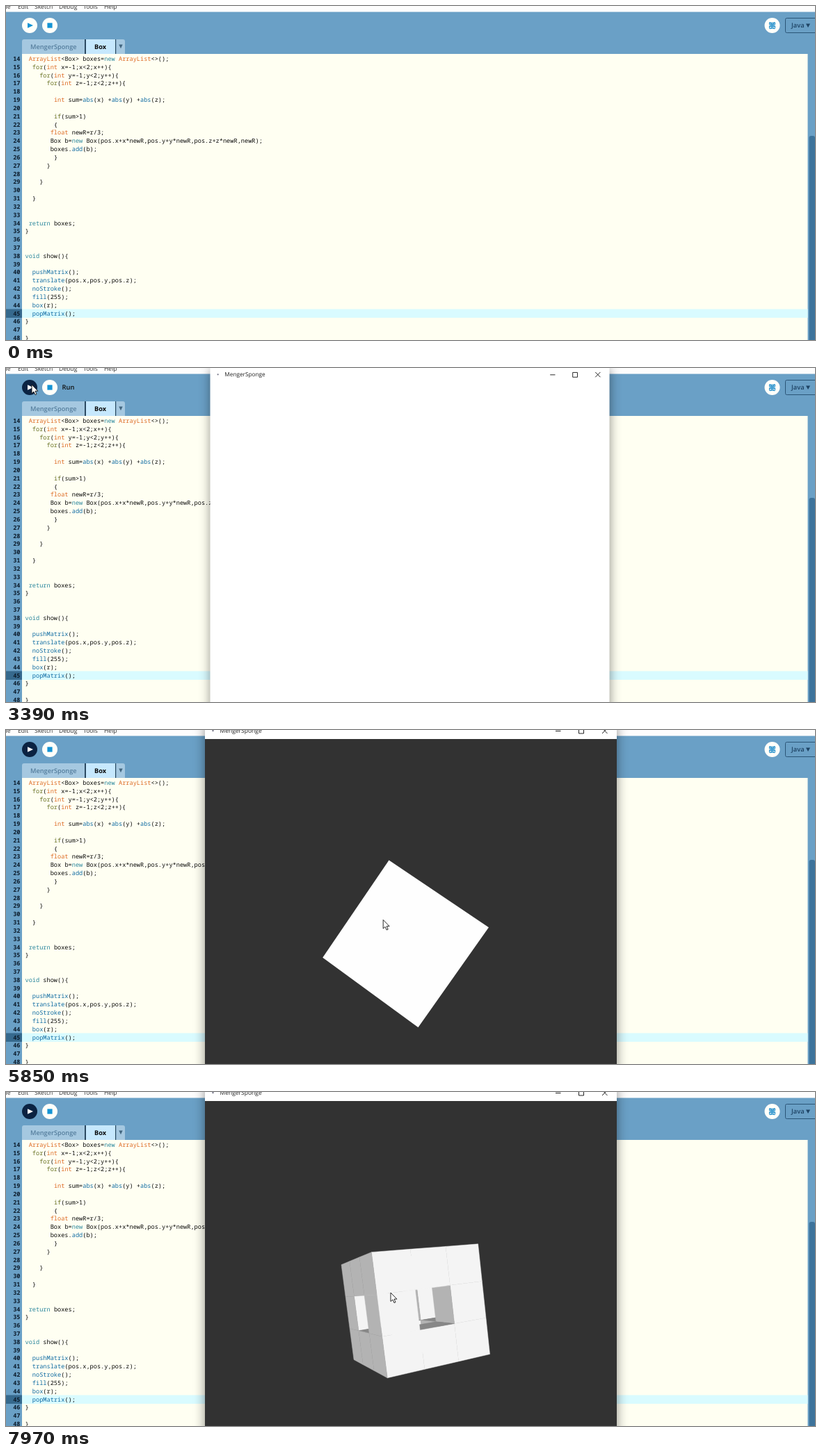
Recreate the animation shown at these times as an HTML page with a canvas. Size 1163 px wide and 481 px high, loop 8000 ms.

```html
<!DOCTYPE html>
<html lang="en">
<head>
<meta charset="utf-8">
<title>Sponge sketch</title>
<style>
  html, body { margin: 0; width: 100%; height: 100%; overflow: hidden; background: #fffff2; }
  #stage { position: relative; width: 1163px; height: 481px; overflow: hidden; }
  #stage > svg { position: absolute; left: 0; top: 0; }
  text { text-rendering: geometricPrecision; white-space: pre; }
  .ui { font-family: "Open Sans", "Noto Sans", sans-serif; }
  .semi { font-weight: 600; }
  #code, #nums { font: 8.62px "Noto Sans Mono", "DejaVu Sans Mono", monospace; }
  #nums { font-weight: 600; text-anchor: end; fill: #0c1c2c; }
  #win {
    position: absolute; left: 286px; top: -10px; width: 592px; height: 620px;
    background: #fff; transform-origin: 0 0; box-shadow: 0 3px 15px rgba(0, 0, 0, .45);
  }
  #win canvas { position: absolute; left: 0; top: 23px; }
  #win svg { position: absolute; left: 0; top: 0; }
</style>
</head>
<body>
<div id="stage">
  <svg width="1163" height="481">
    <rect width="1163" height="481" fill="#6aa0c6"/>
    <rect width="1163" height="8" fill="#fdfdfd"/>
    <rect y="8" width="1163" height="1" fill="#b4cfe2"/>
    <g class="ui" font-size="8.6" fill="#333">
      <text x="-7" y="4">File</text><text x="17" y="4">Edit</text>
      <text x="41" y="4">Sketch</text><text x="76" y="4">Debug</text>
      <text x="111" y="4">Tools</text><text x="141" y="4">Help</text>
    </g>

    <circle id="play" cx="34" cy="28" r="11"/>
    <path id="playMark" d="M31 24.2L39 28L31 31.8Z"/>
    <circle cx="63" cy="28" r="11" fill="#fffffa"/>
    <rect x="59.4" y="24.4" width="7.2" height="7.2" fill="#1594d4"/>
    <text id="run" class="ui semi" x="80.5" y="31.3" font-size="9.4" fill="#111">Run</text>

    <circle cx="1101.5" cy="28" r="11" fill="#fffffa"/>
    <g fill="none" stroke="#3b9bd0" stroke-width="1.4">
      <path d="M1100.6 23.5V33M1102.4 23.5V33M1098 26.8H1105M1098 29H1105"/>
      <path d="M1100.6 27Q1098.5 22 1097.6 24.5V27M1102.4 27Q1104.5 22 1105.4 24.5V27"/>
      <path d="M1100.6 29H1097.6V31.5Q1098.5 34 1100.6 31M1102.4 29H1105.4V31.5Q1104.5 34 1102.4 31"/>
    </g>
    <rect x="1120.5" y="17.5" width="60" height="21" rx="2" fill="none" stroke="#2b5577"/>
    <text class="ui semi" x="1129" y="31.2" font-size="9.3" fill="#1f4465">Java</text>
    <path d="M1150 25.5H1156L1153 31Z" fill="#1f4465"/>

    <path d="M23 69V51Q23 48 26 48H113V69Z" fill="#a5c8e0"/>
    <rect x="113" y="48" width="2" height="21" fill="#2c4a62"/>
    <rect x="115" y="48" width="42" height="21" fill="#c6e8fd"/>
    <rect x="157" y="48" width="1.4" height="21" fill="#2c4a62"/>
    <path d="M158.4 69V48H168Q171 48 171 51V69Z" fill="#a5c8e0"/>
    <path d="M162.3 55.5H167.7L165 61.2Z" fill="#41657f"/>
    <g class="ui semi" font-size="9.2">
      <text x="35" y="61.5" fill="#557e9d">MengerSponge</text>
      <text x="127" y="61.5" fill="#0a0a0a" font-weight="700">Box</text>
    </g>

    <rect x="23" y="69" width="1129.5" height="412" fill="#fffff2"/>
    <rect x="0" y="436.5" width="23" height="12.5" fill="#36698d"/>
    <rect x="23" y="436.5" width="1129.5" height="12.5" fill="#d9fbff"/>
    <rect x="1154.5" y="187" width="8.5" height="310" rx="3" fill="#3d739b"/>
    <g id="nums"></g>
    <g id="code"></g>
    <rect id="caret" x="100" y="436.5" width="1" height="12.5" fill="#000"/>
  </svg>

  <div id="win">
    <svg width="592" height="23">
      <circle cx="11.5" cy="11" r="1.2" fill="#778"/>
      <text class="ui" x="21.5" y="14.2" font-size="8.5" fill="#222">MengerSponge</text>
      <path d="M504 11.5H511.5M537.5 8H544.5V15H537.5ZM571 7.5L578.5 15M578.5 7.5L571 15"
            fill="none" stroke="#222"/>
    </svg>
    <canvas id="view" width="592" height="600"></canvas>
  </div>

  <svg width="1163" height="481">
    <circle id="click" r="9" fill="#f2ec2c" fill-opacity=".9"/>
    <path id="arrow" d="M0 0V12.6L2.9 10L5 14.6L7 13.7L5 9.2H8.9Z" fill="#fff" stroke="#111" stroke-width=".9"/>
    <path id="beam" d="M-2 -6H2M0 -6V6M-2 6H2" fill="none" stroke="#77776f" stroke-width=".9"/>
  </svg>
</div>

<script>
const LOOP = 8000, OPEN = 3260, TICK = 66.34, SPLIT = 6570;
const $ = id => document.getElementById(id);
const show = (id, on) => { $(id).style.display = on ? '' : 'none'; };

// ---- editor text ----
const FIRST = 14, ROW = 11.83, COL = 5.172;
const SOURCE = ` ArrayList<Box> boxes=new ArrayList<>();
  for(int x=-1;x<2;x++){
    for(int y=-1;y<2;y++){
      for(int z=-1;z<2;z++){

        int sum=abs(x) +abs(y) +abs(z);

        if(sum>1)
        {
       float newR=r/3;
       Box b=new Box(pos.x+x*newR,pos.y+y*newR,pos.z+z*newR,newR);
       boxes.add(b);
        }
      }

    }

  }


 return boxes;
}


void show(){

  pushMatrix();
  translate(pos.x,pos.y,pos.z);
  noStroke();
  fill(255);
  box(r);
  popMatrix();
}

}`.split('\n');

const INKS = [
  [/^(ArrayList|int|float)$/, '#dd6a24'],
  [/^(for|if)$/, '#677022'],
  [/^(new|void|return)$/, '#2b879d'],
  [/^(abs|add|pushMatrix|translate|noStroke|fill|box|popMatrix)$/, '#0f6ba3']
];
const inkOf = word => (INKS.find(([re]) => re.test(word)) || [0, '#0a0a0a'])[1];

function addText(parent, x, y, str, fill) {
  const el = document.createElementNS('http://www.w3.org/2000/svg', 'text');
  el.setAttribute('x', x.toFixed(2));
  el.setAttribute('y', y.toFixed(2));
  if (fill) el.setAttribute('fill', fill);
  el.textContent = str;
  parent.append(el);
}

SOURCE.forEach((line, i) => {
  const y = 78.9 + i * ROW;
  addText($('nums'), 20.5, y, FIRST + i);
  for (const m of line.matchAll(/\w+|[^\w\s]+/g))
    addText($('code'), 27.5 + m.index * COL, y, m[0], inkOf(m[0]));
});

// ---- pointer: time, x, y ----
const PATH = [
  [250, 1091, 465], [460, 533, 272], [790, 533, 272], [930, 194, 127], [1260, 194, 127],
  [1400, 130, 82], [1590, 62, 42], [1800, 33, 27], [1990, 37, 24], [3420, 37, 24],
  [3800, 420, 150], [3990, 441, 146], [4300, 441, 146], [4900, 386, 42], [5051, 334, 28],
  [5200, 301, 23], [5450, 370, 90], [5780, 540, 270], [6200, 572, 319], [7000, 572, 319],
  [7500, 556, 295], [7970, 553, 289]
];

function pointerAt(t) {
  const i = PATH.findIndex(p => p[0] >= t);
  if (i < 0) return PATH[PATH.length - 1].slice(1);
  if (i === 0) return PATH[0].slice(1);
  const [t0, x0, y0] = PATH[i - 1], [t1, x1, y1] = PATH[i];
  const k = (t - t0) / (t1 - t0), e = k * k * (3 - 2 * k);
  return [x0 + (x1 - x0) * e, y0 + (y1 - y0) * e];
}

// ---- rotating solid ----
const EYE = 513.5, SIDE = 148.25, MID = 296;
const ctx = $('view').getContext('2d');
const CUBE = { half: SIDE / 2, cells: [[0, 0, 0]] };
const SPONGE = { half: SIDE / 6, cells: [] };
for (let x = -1; x < 2; x++)
  for (let y = -1; y < 2; y++)
    for (let z = -1; z < 2; z++)
      if (Math.abs(x) + Math.abs(y) + Math.abs(z) > 1) SPONGE.cells.push([x, y, z]);

function spin(a) {
  const turn = (p, q, ang) => {
    const c = Math.cos(ang), s = Math.sin(ang);
    return [p * c - q * s, p * s + q * c];
  };
  return ([x, y, z]) => {
    [x, y] = turn(x, y, a * .1);
    [z, x] = turn(z, x, a * .4);
    [y, z] = turn(y, z, a);
    return [x, y, z];
  };
}

function drawSolid(solid, a) {
  const rot = spin(a), h = solid.half;
  const taken = new Set(solid.cells.map(String));
  const range = c => {
    const [x, y, z] = rot(c.map(v => v * 2 * h));
    return Math.hypot(x, y, z - EYE);
  };
  ctx.fillStyle = '#323232';
  ctx.fillRect(0, 0, 592, 600);
  ctx.lineWidth = .5;
  const order = [...solid.cells].sort((p, q) => range(q) - range(p));
  for (const cell of order)
    for (let axis = 0; axis < 3; axis++)
      for (const sign of [-1, 1]) {
        const dir = [0, 0, 0];
        dir[axis] = sign;
        if (taken.has(String(cell.map((v, i) => v + dir[i])))) continue;
        const n = rot(dir);
        const at = rot(cell.map((v, i) => (2 * v + dir[i]) * h));
        if (n[2] * EYE <= n[0] * at[0] + n[1] * at[1] + n[2] * at[2]) continue;
        const tone = Math.round(127 + 128 * Math.max(0, n[2]));
        ctx.fillStyle = ctx.strokeStyle = `rgb(${tone},${tone},${tone})`;
        ctx.beginPath();
        for (const [u, v] of [[-1, -1], [1, -1], [1, 1], [-1, 1]]) {
          const corner = [...dir];
          corner[(axis + 1) % 3] = u;
          corner[(axis + 2) % 3] = v;
          const [x, y, z] = rot(cell.map((c, i) => (2 * c + corner[i]) * h));
          const k = EYE / (EYE - z);
          ctx.lineTo(MID + x * k, MID + y * k);
        }
        ctx.closePath();
        ctx.fill();
        if (solid === SPONGE) ctx.stroke();
      }
}

// ---- one moment ----
function render(t) {
  const step = Math.floor((t - OPEN) / TICK + .1);
  const q = t < OPEN ? t : OPEN + step * TICK;

  const running = t >= 2190;
  $('play').setAttribute('fill', running ? '#0b2342' : '#fffffa');
  $('playMark').setAttribute('fill', running ? '#fff' : '#1594d4');
  show('run', running && t < 3450);
  show('caret', t >= 2520 && t < 3060);

  show('win', t >= OPEN);
  if (t >= OPEN) {
    const k = Math.max(0, 1 - step / 3);
    $('win').style.opacity = Math.min(1, .45 + step * .3);
    $('win').style.transform = `translate(${22.5 * k}px,${26 * k}px) scale(${1 - .091 * k})`;
    show('view', step >= 3);
    if (step >= 3) drawSolid(q >= SPLIT ? SPONGE : CUBE, .616 * (q - 3391) / 1000);
  }

  const [x, y] = pointerAt(q);
  const typing = y > 69 && t < 2000;
  show('beam', typing && t >= 250);
  show('arrow', !typing);
  for (const id of ['beam', 'arrow', 'click'])
    $(id).setAttribute('transform', `translate(${x.toFixed(1)},${y.toFixed(1)})`);
  show('click', (t >= 2390 && t < 2520) || (t >= SPLIT && t < 6710));
}

const start = performance.now();
function frame() {
  render((performance.now() - start) % LOOP);
  requestAnimationFrame(frame);
}
frame();
</script>
</body>
</html>
```
